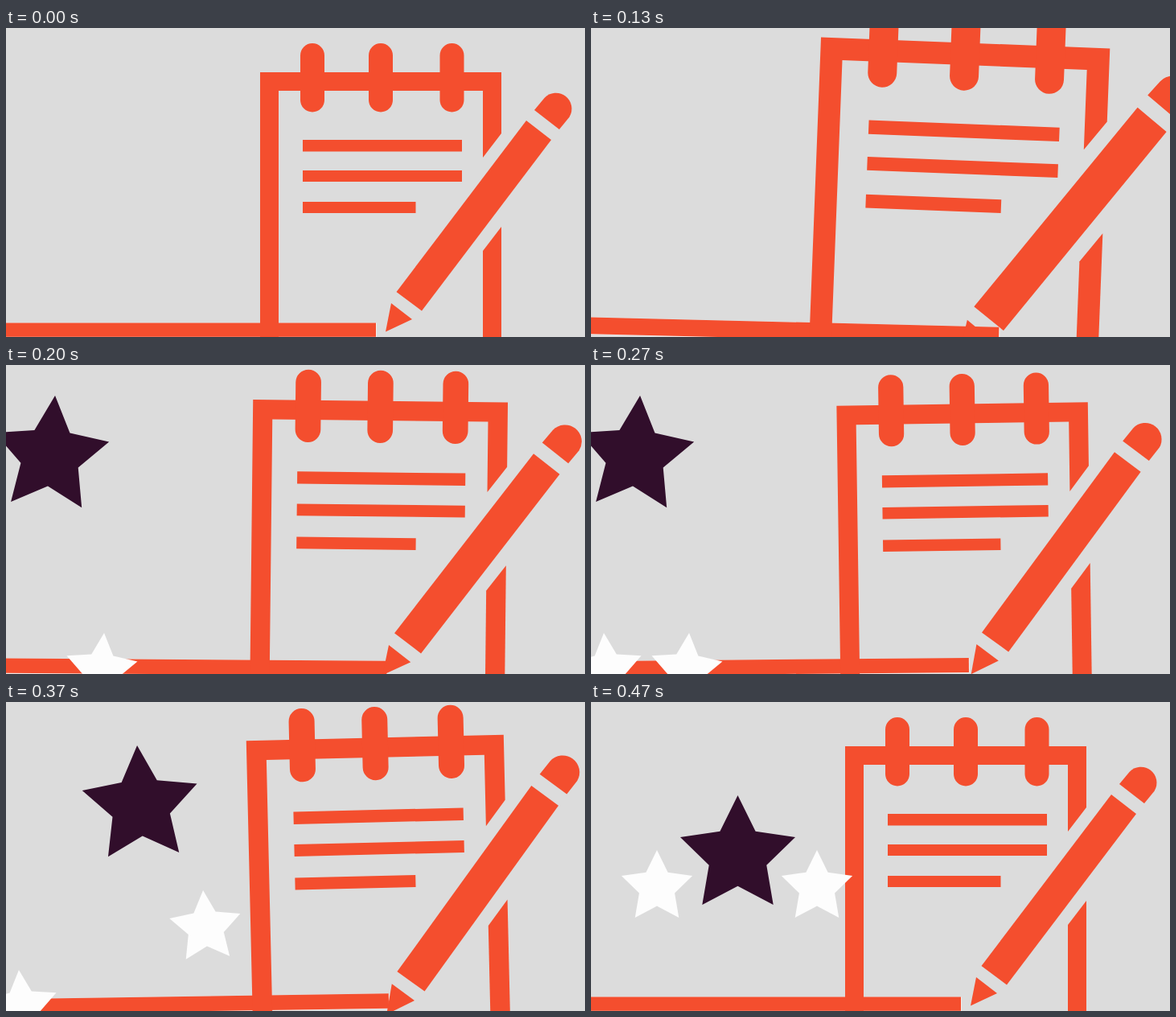
Recreate the animation shown at these times as an HTML page. Size 720x384 px, loop 5.01 s.

```html
<!DOCTYPE html>
<html lang="en">
<head>
<meta charset="utf-8">
<title>Notepad and stars</title>
<style>
  html, body { margin: 0; width: 100%; height: 100%; overflow: hidden; background: #dcdcdc; }
  svg { display: block; width: 100%; height: 100%; }
</style>
</head>
<body>
<svg viewBox="0 0 720 384" fill="#f44e2e">
  <rect width="720" height="384" fill="#dcdcdc"/>
  <g id="bar">
    <rect x="-16" y="366.5" width="477" height="18" fill="#f3eeec"/>
    <rect x="-16" y="366.5" width="476" height="17.3"/>
  </g>
  <g id="notepad">
    <path d="M316 420V55H616V131L593 161V78H339V420Z"/>
    <path d="M616 247V420H593V277Z"/>
    <rect x="366" y="19" width="30" height="85.5" rx="15"/>
    <rect x="451" y="19" width="30" height="85.5" rx="15"/>
    <rect x="539.5" y="19" width="30" height="85.5" rx="15"/>
    <path d="M369 139H567V153.5H369ZM369 177H567V191H369ZM369 216H509.5V230H369Z"/>
    <path d="M657 102L669.5 87A19.6 19.6 0 0 1 700.5 110.7L688 126Z"/>
    <path d="M647 115L678 139L517 351.5L485.5 328Z"/>
    <path d="M479 342L505 362L472 377.5Z"/>
  </g>
  <g id="stars"></g>
</svg>
<script>
const LOOP = 5010, FPS = 30;
const byId = id => document.getElementById(id);

// [step, degrees] of the notepad's wobble
const wobble = [[0, 0], [2, 1.67], [3, 2.25], [4, 2.23], [6, .63], [7, 0],
                [8, -.83], [9.5, -1.4], [11, -1.34], [14, 0]];

// Poses are [first step, x, y, degrees]; each is held until the next.
const stars = [
  { radius: 46.4, fill: '#fdfdfd', poses: [[8, 19.7, 379.2, -4.6], [13, 82, 230.4, 0]] },
  { radius: 46.4, fill: '#fdfdfd', poses: [[6, 118.3, 379.2, 4.6], [10, 248.3, 280.3, -4], [13, 281, 230.4, 0]] },
  { radius: 75.2, fill: '#310e2b', poses: [[5, 55, 113, 4.6], [10, 167.5, 129, -3.4], [13, 182.5, 191.2, 0]] }
];

function starPoints(radius) {
  return Array.from({ length: 10 }, (_, i) => {
    const r = i % 2 ? radius * .5 : radius, a = i * Math.PI / 5;
    return `${(r * Math.sin(a)).toFixed(2)},${(-r * Math.cos(a)).toFixed(2)}`;
  }).join(' ');
}

for (const star of stars) {
  star.node = document.createElementNS('http://www.w3.org/2000/svg', 'polygon');
  star.node.setAttribute('points', starPoints(star.radius));
  star.node.setAttribute('fill', star.fill);
  byId('stars').append(star.node);
}

function angleAt(step) {
  const i = wobble.findIndex(key => key[0] >= step);
  if (i <= 0) return 0;
  const [s0, a0] = wobble[i - 1], [s1, a1] = wobble[i];
  return a0 + (a1 - a0) * (step - s0) / (s1 - s0);
}

function turn(id, x, y, angle, scale) {
  byId(id).setAttribute('transform',
    `translate(${x} ${y}) rotate(${angle}) scale(${scale}) translate(${-x} ${-y})`);
}

function draw(ms) {
  const step = Math.min(14, Math.floor((ms + 4) * FPS / 1000));
  const angle = angleAt(step);
  const scale = 1 + (angle > 0 ? angle * .089 : angle * -.05);
  turn('notepad', 509, 230, angle, scale);
  turn('bar', 222, 375, angle * .62, scale);
  for (const { node, poses } of stars) {
    const pose = poses.filter(p => p[0] <= step).pop();
    node.setAttribute('visibility', pose ? 'visible' : 'hidden');
    if (pose) node.setAttribute('transform', `translate(${pose[1]} ${pose[2]}) rotate(${pose[3]})`);
  }
}

const start = performance.now();
function tick() {
  draw((performance.now() - start) % LOOP);
  requestAnimationFrame(tick);
}
tick();
</script>
</body>
</html>
```
